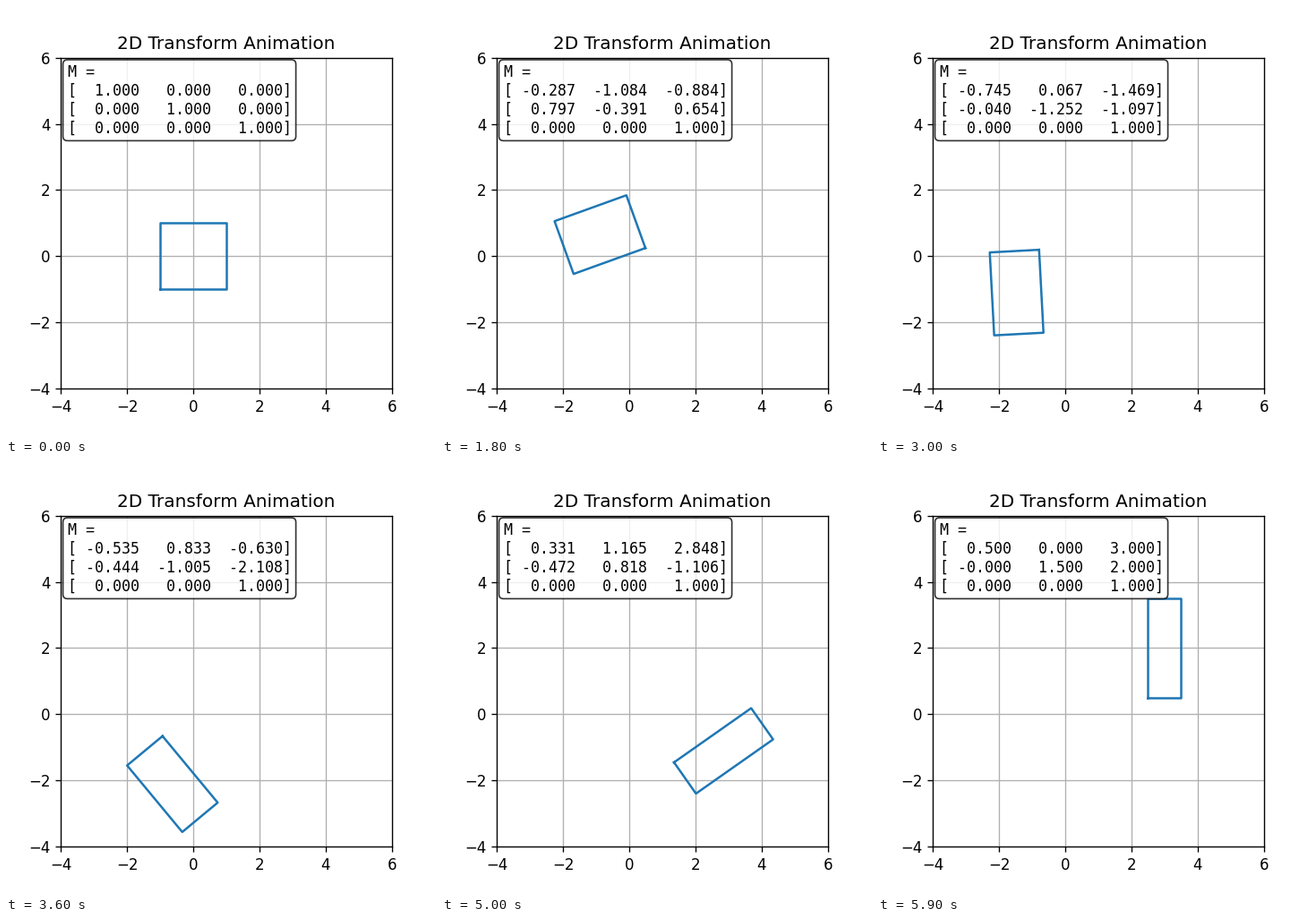
A matplotlib script for the animation above (6000 ms loop, 480 by 480 pixels).

```python
import numpy as np
import matplotlib.pyplot as plt
from matplotlib.animation import FuncAnimation

FRAMES = 60
SQUARE = np.array([
    [-1, 1, 1, -1, -1],
    [-1, -1, 1, 1, -1],
    [1, 1, 1, 1, 1],
])


def scaling(sx, sy):
    return np.diag([sx, sy, 1.0])


def translation(tx, ty):
    return np.array([[1, 0, tx], [0, 1, ty], [0, 0, 1.0]])


def rotation(angle):
    c, s = np.cos(angle), np.sin(angle)
    return np.array([[c, -s, 0], [s, c, 0], [0, 0, 1.0]])


def transform(t):
    """Scale, then shift, then turn about the origin."""
    return (rotation(2 * np.pi * t)
            @ translation(3 * t, 2 * t)
            @ scaling(1 - 0.5 * t, 1 + 0.5 * t))


def matrix_text(m):
    rows = ["[" + " ".join(f"{v:7.3f}" for v in row) + "]" for row in m]
    return "\n".join(["M ="] + rows)


fig, ax = plt.subplots(figsize=(4, 4), dpi=120)
ax.set_aspect("equal")
ax.set_xlim(-4, 6)
ax.set_ylim(-4, 6)
ax.set_xticks(range(-4, 7, 2))
ax.set_yticks(range(-4, 7, 2))
ax.grid(True)
ax.set_title("2D Transform Animation")

outline, = ax.plot([], [], color="tab:blue", lw=1.5)
label = ax.text(
    0.02, 0.98, "", transform=ax.transAxes, va="top", ha="left",
    family="DejaVu Sans Mono", fontsize=10,
    bbox=dict(boxstyle="round", facecolor="white", alpha=0.8),
)


def update(i):
    m = transform(i / (FRAMES - 1))
    x, y, _ = m @ SQUARE
    outline.set_data(x, y)
    label.set_text(matrix_text(m))
    return outline, label


anim = FuncAnimation(fig, update, frames=FRAMES, interval=100,
                     repeat=True, repeat_delay=0)
plt.show()
```
